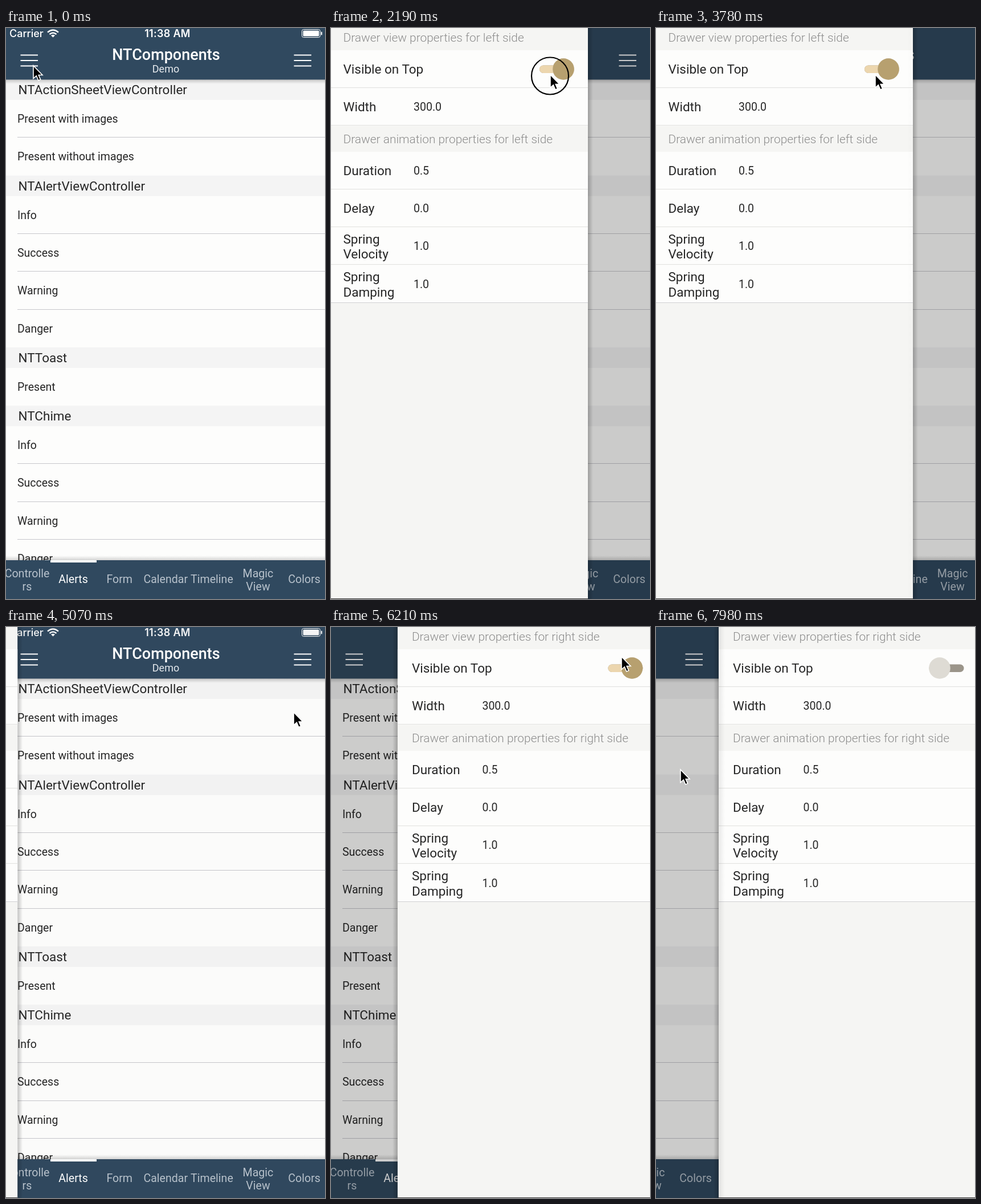
Animation of 560 by 1001 pixels, one loop 8000 ms. Source, as an HTML page:

```html
<!DOCTYPE html>
<html lang="en">
<head>
<meta charset="utf-8">
<title>Drawer demo</title>
<style>
html, body { margin: 0; width: 100%; height: 100%; overflow: hidden; background: #fdfdfc; }
svg { display: block; width: 560px; height: 1001px; font-family: Roboto, sans-serif; fill: #262626; }
.section { font-size: 22.5px; }
.row, .value { font-size: 19.5px; }
.label { font-size: 22.5px; }
.light { font-size: 20.9px; font-weight: 300; fill: #8c8c8c; }
.tab { font-size: 19.6px; text-anchor: middle; fill: #b8c2cc; }
.status { font: 500 18px Inter, sans-serif; fill: #fff; }
</style>
</head>
<body>
<svg id="stage" viewBox="0 0 560 1001"></svg>
<script>
const LOOP = 8000, LEFT_W = 451, RIGHT_W = 450, RIGHT_X = 110;
const MAIN_W = 566, PUSH_RIGHT = 454;
const stage = document.getElementById('stage');

const rect = (x, y, w, h, fill, extra = '') =>
  `<rect x="${x}" y="${y}" width="${w}" height="${h}" fill="${fill}" ${extra}/>`;
const text = (x, y, s, cls, extra = '') => `<text x="${x}" y="${y}" class="${cls}" ${extra}>${s}</text>`;
const gradient = (id, dir, alpha) =>
  `<linearGradient id="${id}" ${dir}><stop stop-color="#000" stop-opacity="${alpha}"/><stop offset="1" stop-color="#000" stop-opacity="0"/></linearGradient>`;
const burger = x =>
  `<path d="M${x} 47.5h30.5m-30.5 9.5h30.5m-30.5 9.5h30.5" stroke="#fff" stroke-width="1.9"/>`;

function list() {
  const alerts = ['Info', 'Success', 'Warning', 'Danger'];
  const groups = [
    ['NTActionSheetViewController', ['Present with images', 'Present without images']],
    ['NTAlertViewController', alerts],
    ['NTToast', ['Present']],
    ['NTChime', alerts]
  ];
  let y = 90, out = '';
  for (const [title, rows] of groups) {
    out += rect(0, y, MAIN_W, 36, '#f4f4f4') + text(21.5, y + 26, title, 'section');
    y += 36;
    rows.forEach((row, i) => {
      out += text(20, y + 40, row, 'row');
      y += 66.3;
      if (i < rows.length - 1) out += rect(20, Math.round(y) - 1, MAIN_W - 20, 1, '#c6c6cb');
    });
  }
  return out;
}

function tabs() {
  const names = [['Controlle', 'rs'], ['Alerts'], ['Form'], ['Calendar'], ['Timeline'], ['Magic', 'View'], ['Colors']];
  return names.map((lines, i) => lines.map((s, k) =>
    text(37 + i * 81.1, lines.length > 1 ? 962.5 + k * 23 : 973, s, 'tab', i === 1 ? 'style="fill:#fff"' : '')
  ).join('')).join('');
}

function statusBar() {
  return `<g id="status">${text(6, 16, 'Carrier', 'status')}
    ${text(283.5, 16, '11:38 AM', 'status', 'text-anchor="middle" style="font-weight:600;letter-spacing:.3px"')}
    <path d="M73 7.5q9.5-8 19 0M76.5 11q6-5 12 0" fill="none" stroke="#fff" stroke-width="2.4"/>
    <path d="M79 13q3.5-2.5 7 0l-3.5 3.5z" fill="#fff"/>
    <rect x="519.5" y="2.5" width="32" height="14" rx="3" fill="none" stroke="#fff"/>
    ${rect(521.5, 4.5, 28, 10, '#fff', 'rx="1.5"')}${rect(553, 6.5, 2, 6, '#fff', 'rx="1"')}</g>`;
}

function mainView() {
  return `<g id="main">${rect(0, 0, MAIN_W, 1001, '#fdfdfc')}${list()}
    ${rect(0, 90, MAIN_W, 8, 'url(#down)')}${rect(0, 925, MAIN_W, 8, 'url(#up)')}
    ${rect(0, 0, MAIN_W, 90.5, '#30495f')}${rect(0, 933, MAIN_W, 68, '#30495f')}
    ${rect(78, 933, 81, 4, '#fff')}${tabs()}${burger(25.5)}${burger(505.5)}
    ${text(281, 56, 'NTComponents', '', 'text-anchor="middle" fill="#fff" font-size="27" font-weight="500"')}
    ${text(280.5, 78, 'Demo', '', 'text-anchor="middle" fill="#e6eaee" font-size="18"')}
    ${statusBar()}</g>${rect(0, 0, 560, 1001, '#000', 'id="dim"')}`;
}

function drawer(side, x, w) {
  const edge = side === 'left' ? x + w : x;
  const rows = [
    [39, 'Visible on Top'], [105.2, 'Width', '300.0'], [217, 'Duration', '0.5'], [283.2, 'Delay', '0.0'],
    [349.4, 'Spring Velocity', '1.0'], [415.6, 'Spring Damping', '1.0']
  ];
  let out = rect(x, 0, w, 1001, '#f5f5f3');
  for (const [y, label, value] of rows) {
    const words = label.startsWith('Spring') ? label.split(' ') : [label];
    out += rect(x, y, w, 66.2, '#fdfdfc') + rect(x, Math.round(y + 66) - 1, w, 1, y > 400 ? '#d0d0d4' : '#e2e2e0');
    words.forEach((s, i) => out += text(21.5, y + (words.length > 1 ? 28.5 + i * 26.5 : 41), s, 'label'));
    if (value) out += text(145, y + 40, value, 'value');
  }
  const shadow = side === 'left' ? rect(edge, 0, 9, 1001, 'url(#right)') : rect(edge - 9, 0, 9, 1001, 'url(#left)');
  const inner = side === 'left' ? rect(edge - 11, 0, 11, 1001, 'url(#left)') : rect(edge, 0, 11, 1001, 'url(#right)');
  return `<g id="${side}Drawer">${shadow}${out}
    ${text(21.5, 24, `Drawer view properties for ${side} side`, 'light')}
    ${text(21.5, 202, `Drawer animation properties for ${side} side`, 'light')}
    ${rect(x, 1000, w, 1, '#333')}<g id="${side}Inner">${inner}</g>
    <circle id="${side}Ripple" cy="72" fill="#fff0cc"/>
    ${rect(366, 65.5, 61, 13.5, '#9b958a', 'rx="6.7"')}${rect(366, 65.5, 61, 13.5, '#ecd6ae', `rx="6.7" id="${side}Track"`)}
    <g id="${side}Thumb"><circle cy="72" r="18.8" fill="#dedbd4"/><circle id="${side}On" cy="72" r="18.8" fill="#b7a06f"/></g></g>`;
}

stage.innerHTML = `<defs>
  ${gradient('down', 'x2="0" y2="1"', .2)}${gradient('up', 'x2="0" y1="1" y2="0"', .16)}
  ${gradient('right', '', .22)}${gradient('left', 'x1="1" x2="0"', .22)}</defs>
  ${mainView()}${drawer('left', 0, LEFT_W)}${drawer('right', -3.5, RIGHT_W + 4)}
  <g id="cursor"><circle id="ring" cx="-.5" cy="2" r="32.5" fill="none" stroke="#000" stroke-width="2.2"/>
  <path d="M0 0V22.5L5.3 17.8 8.8 26 12.6 24.4 9.2 16.5H16Z" fill="#000" stroke="#fff" stroke-width="1.6"/></g>`;

const el = {};
stage.querySelectorAll('[id]').forEach(e => el[e.id] = e);
const set = (id, attrs) => { for (const k in attrs) el[id].setAttribute(k, attrs[k]); };
const move = (id, x, y = 0) => set(id, { transform: `translate(${x} ${y})` });
const clamp = v => Math.max(0, Math.min(1, v));
const ease = v => { v = clamp(v); return v * v * (3 - 2 * v); };

// Critically damped spring, settled after about half a second.
const spring = ms => {
  const u = Math.max(0, ms) * .018;
  return 1 - (1 + u) * Math.exp(-u);
};

// Switch travel: a slight overshoot, then back to rest.
const flip = ms => ms < 150 ? 1.19 * ease(ms / 150) : 1.19 - .19 * ease((ms - 150) / 150);

// Cursor moves: start, end, x, y.
const path = [
  [0, 0, 48, 66], [60, 330, 41, 54], [1050, 1900, 385, 82], [4000, 4500, 505, 150],
  [5050, 5550, 510, 52], [6200, 6700, 500, 72], [7300, 7900, 43, 250]
];
const presses = [[370, 490], [2130, 2250], [3330, 3450], [4680, 4790], [5730, 5850], [6790, 6910]];

function drawSwitch(side, off, since) {
  const x = 408 - 23.6 * off, on = 1 - clamp(off), p = clamp(since / 330);
  move(side + 'Thumb', x);
  set(side + 'On', { opacity: on });
  set(side + 'Track', { opacity: on });
  set(side + 'Ripple', { cx: x, r: 19 + 27 * Math.sqrt(p), opacity: since > 0 ? 1 - p : 0 });
}

function draw(t) {
  const left = spring(t - 510) - spring(t - 4800), right = spring(t - 5870);
  const pushL = spring(t - 2400) - spring(t - 3604), pushR = spring(t - 7069);
  const shown = Math.max(left, right);
  move('main', LEFT_W * pushL - PUSH_RIGHT * pushR);
  set('dim', { opacity: .2 * shown });
  set('status', { opacity: 1 - clamp(shown * 1.05) });

  move('leftDrawer', LEFT_W * (left - 1));
  move('rightDrawer', RIGHT_X + 3.5 + RIGHT_W * (1 - right));
  set('leftDrawer', { visibility: left > .001 ? 'visible' : 'hidden' });
  set('rightDrawer', { visibility: right > .001 ? 'visible' : 'hidden' });
  set('leftInner', { opacity: .35 * pushL });
  set('rightInner', { opacity: .35 * pushR });

  drawSwitch('left', flip(t - 2250) - flip(t - 3450), t < 3450 ? t - 2250 : t - 3450);
  drawSwitch('right', flip(t - 6910), t - 6910);

  let [, , x, y] = path[0];
  for (const [a, b, px, py] of path.slice(1)) {
    const k = ease((t - a) / (b - a));
    x += (px - x) * k;
    y += (py - y) * k;
  }
  move('cursor', x, y);
  set('ring', { opacity: presses.some(([a, b]) => t >= a && t < b) ? 1 : 0 });
}

const start = performance.now();
function tick() {
  draw((performance.now() - start) % LOOP);
  requestAnimationFrame(tick);
}
tick();
</script>
</body>
</html>
```
